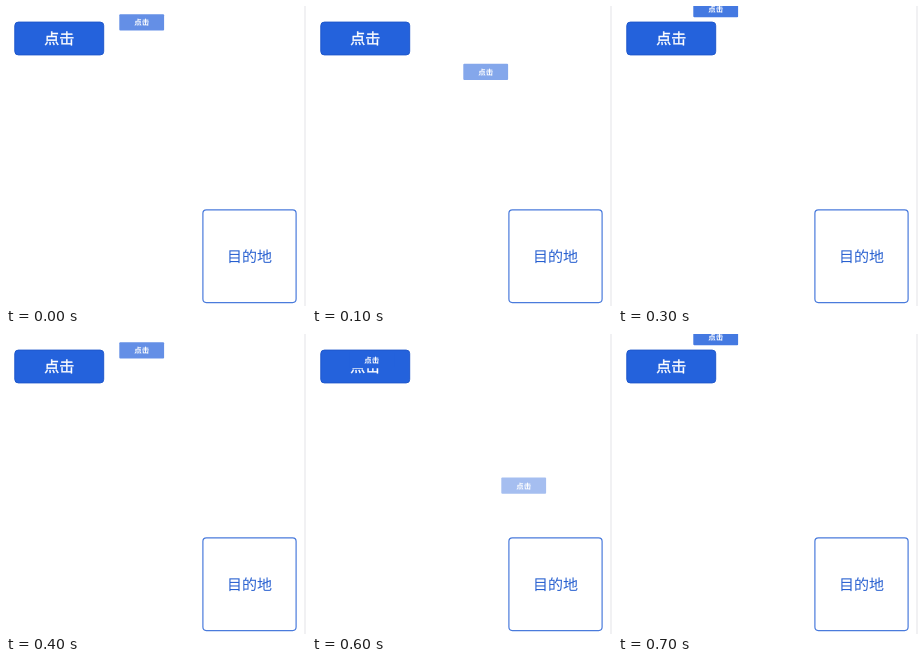
An HTML page that plays this animation: 300x300 px, repeating every 800 ms.

```html
<!DOCTYPE html>
<html lang="zh-CN">
<head>
<meta charset="utf-8">
<style>
  html, body { margin: 0; width: 100%; height: 100%; overflow: hidden; background: #fff; }
  svg { display: block; width: 100%; height: 100%; }
  text { font: 15px "Noto Sans CJK SC", "Noto Sans CJK", sans-serif; text-anchor: middle;
    text-rendering: geometricPrecision; }
  .button rect { fill: #2462dc; stroke: #1f58cc; }
  .button text { fill: #fff; stroke: #fff; stroke-width: .35; }
  .goal rect { fill: none; stroke: #4a7bdc; stroke-width: 1.2; }
  .goal text { fill: #2860d0; }
  .flyer rect { fill: #2462dc; }
  .flyer text { fill: #fff; font-size: 7.5px; font-weight: 700; }
</style>
</head>
<body>
<svg viewBox="0 0 300 300">
  <rect x="298" width="2" height="300" fill="#f1f1f3"/>
  <g class="button">
    <rect x="8.8" y="16.1" width="88.9" height="32.8" rx="3.5"/>
    <text x="53.2" y="38.2">点击</text>
  </g>
  <g class="goal">
    <rect x="196.9" y="203.8" width="93.2" height="92.8" rx="3.5"/>
    <text x="243.5" y="256">目的地</text>
  </g>
  <g class="flyer">
    <rect x=".3" y=".8" width="44.8" height="16.4" rx="1"/>
    <text x="22.8" y="12.1">点击</text>
  </g>
</svg>
<script>
const flyer = document.querySelector('.flyer');
const STEP = 100, COUNT = 4;

// Two copies are visible on the launch step: one landing, one leaving.
const landing = flyer.cloneNode(true);
flyer.after(landing);

function place(el, u) {
  const x = 37 + 38 * u;
  const y = 17 - 41 * u + 18.1 * u * u;
  el.setAttribute('transform', `translate(${x} ${y})`);
  el.setAttribute('opacity', 1 - 0.148 * u);
}

function draw(now) {
  const u = (Math.floor(now / STEP) + 2) % COUNT;
  place(flyer, u);
  place(landing, COUNT);
  landing.style.visibility = u === 0 ? 'visible' : 'hidden';
}

let start;
function tick(now) {
  start ??= now;
  draw(now - start);
  requestAnimationFrame(tick);
}
draw(0);
requestAnimationFrame(tick);
</script>
</body>
</html>
```
